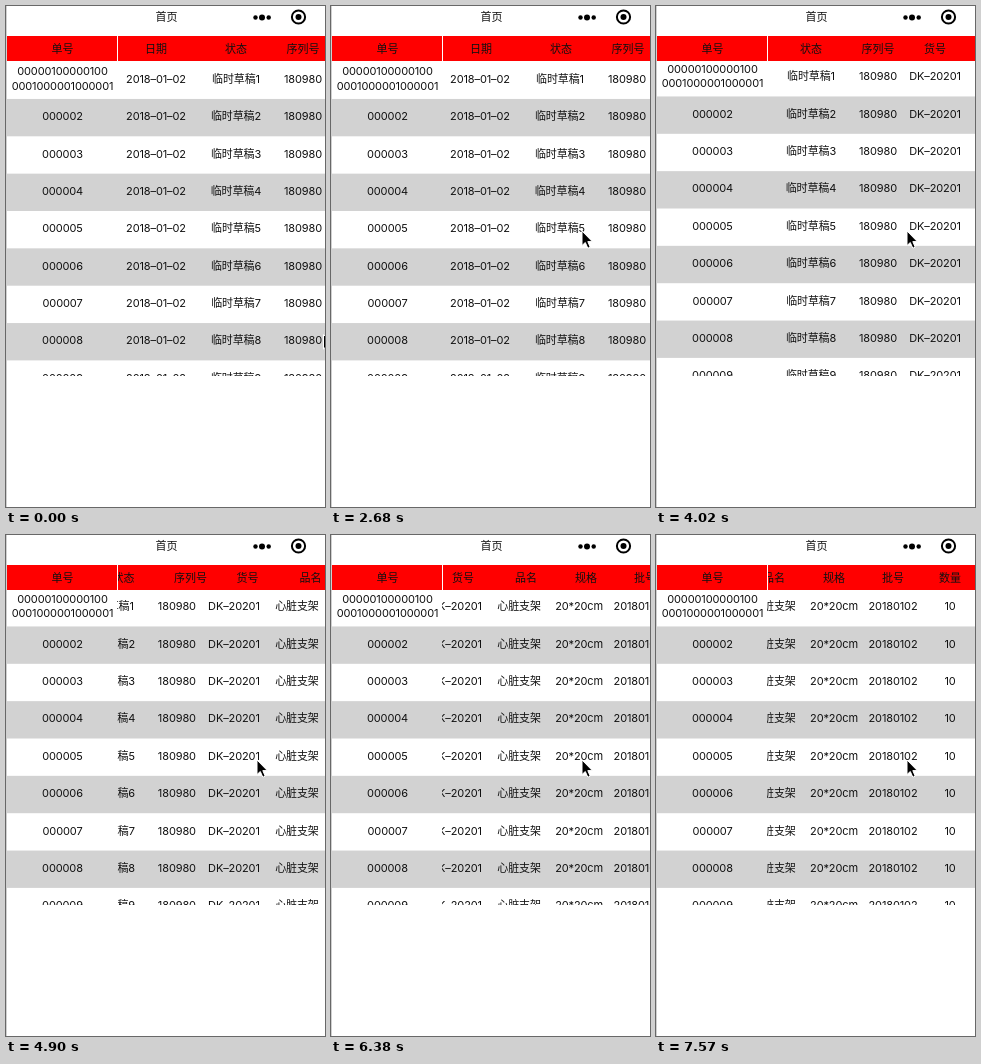
These frames come from a looping animation (319 by 501 pixels, 8 s). An HTML page:

```html
<!DOCTYPE html>
<html lang="zh">
<head>
<meta charset="utf-8">
<title>首页</title>
<style>
  html, body { margin: 0; width: 100%; height: 100%; overflow: hidden; background: #fff; }
  svg { display: block; }
  text {
    font: 11px Inter, "Noto Sans CJK SC", "Noto Sans CJK", sans-serif;
    text-anchor: middle;
    fill: #111;
  }
  #rows text { letter-spacing: -.12px; }
</style>
</head>
<body>
<svg width="319" height="501" viewBox="0 0 319 501">
  <defs>
    <clipPath id="headClip"><rect x="111" y="30" width="208" height="25"/></clipPath>
    <clipPath id="bodyClip"><rect x="1" y="55" width="318" height="315"/></clipPath>
    <clipPath id="cellClip"><rect x="111" y="0" width="208" height="501"/></clipPath>
  </defs>

  <text x="160.5" y="14.7">首页</text>
  <g fill="#000">
    <circle cx="249.5" cy="11.5" r="2.2"/>
    <circle cx="256" cy="11.5" r="3"/>
    <circle cx="262.7" cy="11.5" r="2.2"/>
    <circle cx="292.5" cy="11" r="3"/>
    <circle cx="292.5" cy="11" r="6.6" fill="none" stroke="#000" stroke-width="2"/>
  </g>

  <g id="rows" clip-path="url(#bodyClip)">
    <g id="shift">
      <g id="fixed"></g>
      <g clip-path="url(#cellClip)"><g id="cells"></g></g>
    </g>
  </g>

  <rect x="1" y="30" width="318" height="25" fill="#f00"/>
  <text x="56.5" y="46.7">单号</text>
  <g clip-path="url(#headClip)"><g id="heads"></g></g>
  <rect x="111" y="30" width="1" height="25" fill="#fff"/>
  <rect width="1" height="501" fill="#d0d0d0"/>

  <path id="cursor" d="M0 0V14.5L3.3 11.5L5.8 17.2L8.2 16.2L5.8 10.6H10.3Z"
        fill="#000" stroke="#fff" stroke-width="1" stroke-linejoin="round"/>
</svg>
<script>
  const LOOP = 8000, TICK = 145, ROW = 37.35, TOP = 55.6;
  const $ = id => document.getElementById(id);

  function add(parent, tag, attrs, label = '') {
    const el = document.createElementNS('http://www.w3.org/2000/svg', tag);
    for (const k in attrs) el.setAttribute(k, attrs[k]);
    el.textContent = label;
    parent.append(el);
  }
  const write = (parent, x, y, label) => add(parent, 'text', { x, y }, label);

  // heading, centre, cell text
  const columns = [
    ['日期', 150, () => '2018–01–02'],
    ['状态', 230, n => '临时草稿' + n],
    ['序列号', 297, () => '180980'],
    ['货号', 354, () => 'DK–20201'],
    ['品名', 417, () => '心脏支架'],
    ['规格', 477, () => '20*20cm'],
    ['批号', 536, () => '20180102'],
    ['数量', 593, () => '10']
  ];

  for (const [name, x] of columns) write($('heads'), x, 46.7, name);

  for (let n = 1; n <= 9; n++) {
    const y = TOP + (n - 1) * ROW, base = y + 21.3;
    if (n % 2 === 0) add($('fixed'), 'rect', { x: 1, y, width: 318, height: ROW, fill: '#d2d2d2' });
    if (n === 1) {
      write($('fixed'), 56.5, y + 13.6, '00000100000100');
      write($('fixed'), 56.5, y + 28.2, '0001000001000001');
    } else {
      write($('fixed'), 56.5, base, '00000' + n);
    }
    for (const [, x, cell] of columns) write($('cells'), x, base, cell(n));
  }

  // Each move: start time, number of steps, end value, easing power
  const scroll = [
    [2680, 2, 12, 3.6], [3270, 5, 75, 1], [4460, 5, 140, 1.08],
    [5490, 4, 222, .89], [6380, 2, 256, 2.3], [7280, 2, 299, 1]
  ];
  const lift = [[3270, 5, -2.5, 1], [4460, 2, -1.5, 1]];
  const pointer = [[1500, 4, 1, .8]];

  function track(moves, t) {
    let value = 0;
    for (const [start, steps, end, power] of moves) {
      if (t < start) break;
      const u = Math.min(1, (Math.floor((t - start) / TICK) + 1) / steps);
      value += (end - value) * u ** power;
    }
    return value;
  }

  const move = (id, x, y) => $(id).setAttribute('transform', `translate(${x} ${y})`);

  function draw(t) {
    const p = track(pointer, t);
    move('cells', -track(scroll, t), 0);
    move('heads', -track(scroll, t - TICK), 0); // headings trail one step behind
    move('shift', 0, track(lift, t));
    move('cursor', 317.5 - 66.5 * p, 328.5 - 103.5 * p);
  }

  const begin = performance.now();
  function frame() {
    draw((performance.now() - begin) % LOOP);
    requestAnimationFrame(frame);
  }
  frame();
</script>
</body>
</html>
```
